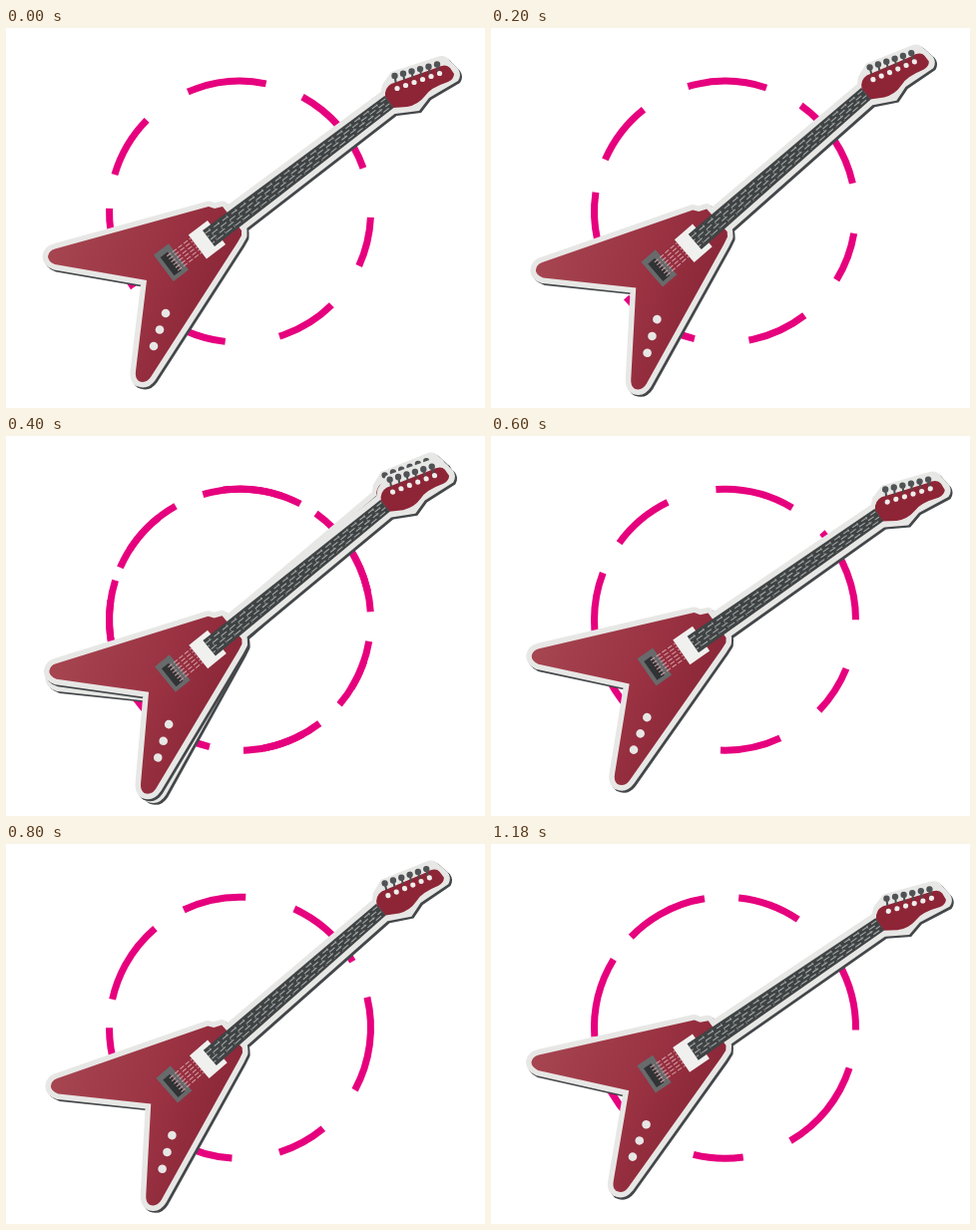
Animation, 480 px wide and 381 px high, one loop 1300 ms. Source, as an HTML page:

```html
<!DOCTYPE html>
<html lang="en">
<head>
<meta charset="utf-8">
<title>Guitar</title>
<style>
  html, body { margin: 0; width: 100%; height: 100%; overflow: hidden; background: #fff; }
  svg { display: block; width: 480px; height: 381px; }
</style>
</head>
<body>
<svg viewBox="0 0 480 381">
  <defs>
    <linearGradient id="red" gradientUnits="userSpaceOnUse" x1="60" y1="200" x2="230" y2="270">
      <stop offset="0" stop-color="#a64450"/>
      <stop offset=".55" stop-color="#9a3242"/>
      <stop offset="1" stop-color="#872536"/>
    </linearGradient>
    <circle id="ring" cx="234.5" cy="184.2" r="131" fill="none" stroke="#e6007e" stroke-width="7"
      pathLength="360" stroke-dasharray="0 22 22 21 27 24 35.5 12.5 37 15 28 22 35 17 42 0"/>
    <path id="body" d="M49 221.500L203 179L209 181L217 179L236 203L236 208L232 215L145 350
      Q140 357 133 354Q129 351 130 344L141 253L49 237Q42 234 42 229Q43 223 49 221.500Z"/>
    <path id="neck" d="M197 203L379.500 68L388.500 80L209 219Z"/>
    <g id="sticker" stroke-width="11" stroke-linejoin="round">
      <use href="#body"/>
      <use href="#neck"/>
      <path stroke="none" d="M374 73L377 57L386 44L432 29Q440 26 445 33L453 41Q457 47 453 53
        L424 70L414 83L390 86Z"/>
    </g>
    <g id="guitar">
      <use href="#sticker" x="2" y="2" fill="#44474a" stroke="#44474a"/>
      <use href="#sticker" fill="#e7e7e5" stroke="#e7e7e5"/>
      <use href="#body" fill="url(#red)"/>
      <path fill="#8e2536" d="M380 69Q379 60 386 56L431 40Q441 35 445 40L449 46Q449 51 443 54
        Q425 60 420 68Q413 77 402 79L388 80Z"/>
      <!-- x runs along the neck -->
      <g transform="translate(203 211) rotate(-37.1)">
        <path fill="#f0f0ee" d="M-14-15H10V15H-14Z"/>
        <path fill="#686a6b" d="M-54-20H-35V13H-54Z"/>
        <path fill="#303334" d="M-50-14H-41V9H-50Z"/>
        <g id="pluck" stroke="#d8a3aa" stroke-dasharray="5 2"/>
      </g>
      <use href="#neck" fill="#3f4344"/>
      <g id="strings" transform="translate(203 211) rotate(-37.1)" stroke="#a9acac"/>
      <g id="pegs"/>
      <g fill="#e7e7e5">
        <circle cx="160" cy="286" r="4.300"/>
        <circle cx="154" cy="302.500" r="4.300"/>
        <circle cx="148" cy="319" r="4.300"/>
      </g>
    </g>
  </defs>
  <use id="oldRing" href="#ring"/>
  <use id="newRing" href="#ring"/>
  <use id="oldGuitar" href="#guitar"/>
  <use id="newGuitar" href="#guitar"/>
</svg>
<script>
const $ = id => document.getElementById(id);
const add = (id, tag, attrs) => {
  const el = document.createElementNS('http://www.w3.org/2000/svg', tag);
  for (const key in attrs) el.setAttribute(key, attrs[key]);
  $(id).append(el);
};

for (let i = 0; i < 6; i++) {
  const n = (i - 2.5) * 3.6 - 2;
  add('pluck', 'path', { d: `M-44 ${n}H-14` });

  const x = 389.5 + i * 8.5, y = 48 - i * 2.3;
  add('pegs', 'path', { d: `M${x} ${y}L${x + 1.2} ${y + 7}`, stroke: '#4a4d4f', 'stroke-width': 2 });
  add('pegs', 'circle', { cx: x, cy: y, r: 3.2, fill: '#505355' });
  add('pegs', 'circle', { cx: x + 2.5, cy: y + 12.5 - i * 0.7, r: 2.6, fill: '#eeeeec' });
}
for (let i = 0; i < 4; i++) {
  const n = i * 4 - 6;
  add('strings', 'path', {
    d: `M0 ${n}L226 ${n * 0.8}`, 'stroke-dasharray': '7 4', 'stroke-dashoffset': i * 5
  });
}
for (let i = 0; i < 20; i++) {
  const t = 6 + i * 11, n = 8 - i * 0.1;
  add('strings', 'path', { d: `M${t} ${-n}V${n}`, 'stroke-dasharray': '3 3', 'stroke-opacity': 0.6 });
}

// Each pose: start time, ring angle, guitar angle
const poses = [
  [0, -19.5, 0], [200, -12.5, -3.8], [400, -3.5, -1.9],
  [600, 0, 2.3], [800, 28.5, -3.8], [1000, 60, 2.8]
];
const turn = (name, [, ring, guitar]) => {
  $(name + 'Ring').setAttribute('transform', `rotate(${ring} 234.5 184.2)`);
  $(name + 'Guitar').setAttribute('transform', `rotate(${guitar} 255 193)`);
};
turn('old', poses[1]);

const start = performance.now();
function draw() {
  const t = Math.max(0, performance.now() - start) % 1300;
  const pose = poses.findLast(p => p[0] <= t);
  turn('new', pose);
  // the third pose is laid over the one before it
  const display = pose === poses[2] ? '' : 'none';
  $('oldRing').style.display = $('oldGuitar').style.display = display;
  requestAnimationFrame(draw);
}
draw();
</script>
</body>
</html>
```
